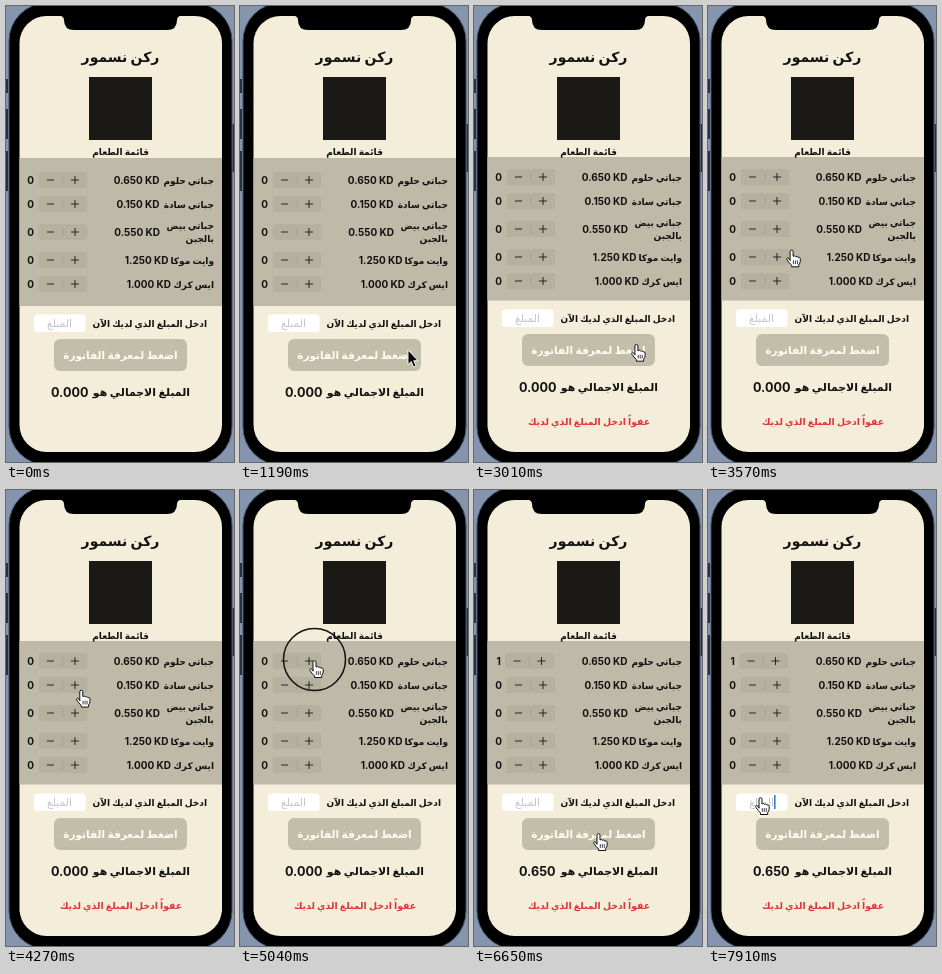
An HTML page that plays this animation: 228x456 px, repeating every 8 s.

```html
<!DOCTYPE html>
<html lang="ar">
<head>
<meta charset="utf-8">
<title>قائمة الطعام</title>
<style>
  html, body { margin: 0; width: 100%; height: 100%; overflow: hidden; background: #8595ad; }
  svg { display: block; width: 228px; height: 456px; }
  text { font: 700 10px Inter, 'DejaVu Sans', sans-serif; fill: #121212; }
  .ar { direction: rtl; font-size: 9px; }
  .mid { text-anchor: middle; }
  .end { text-anchor: end; }
</style>
</head>
<body>
<svg viewBox="0 0 228 456">
  <!-- phone -->
  <path d="M1 73v14M1 103v30M1 145v40M227.500 118v48" stroke="#27303f" stroke-width="2"/>
  <rect x="3" y="-3" width="223" height="462" rx="38" stroke="#40506a"/>
  <rect x="13.500" y="10" width="202.500" height="436" rx="27" fill="#f3edda"/>
  <path d="M53 9.500Q58 10 58 14Q58 24 68 24H161Q171 24 171 14Q171 10 176 9.500Z"/>

  <!-- header -->
  <text class="ar mid" x="114.500" y="56" style="font-size:14px">ركن نسمور</text>
  <rect x="83" y="71" width="63" height="63" fill="#1b1916"/>
  <rect id="panel" x="13.500" width="202.500" fill="#bebaa7"/>
  <text class="ar mid" x="114.500" y="148.500">قائمة الطعام</text>
  <g id="rows"></g>

  <!-- form -->
  <g id="form">
    <text class="ar" x="201" y="320.500">ادخل المبلغ الذي لديك الآن</text>
    <rect x="28" y="308.500" width="51.500" height="17.500" rx="3.500" fill="#fff"/>
    <text class="ar mid" x="53.500" y="320.500" style="font-size:10.800px;fill:#c5c5c9;font-weight:400">المبلغ</text>
    <rect id="caret" x="66" y="310" width="1.600" height="14" fill="#3978dc"/>
    <g id="button">
      <rect x="48" y="333" width="133" height="32" rx="6" fill="#c3bea9"/>
      <text class="ar mid" x="114.500" y="353" style="font-size:10.500px;fill:#fffdf3">اضغط لمعرفة الفاتورة</text>
    </g>
    <text class="ar" x="184" y="390" style="font-size:10.900px">المبلغ الاجمالي هو</text>
    <text id="total" x="45" y="390.500" style="font-size:12.600px"></text>
  </g>
  <text id="error" class="ar mid" x="115" y="418.500" style="font-size:9.300px;fill:#e0343b">عفواً ادخل المبلغ الذي لديك</text>

  <!-- pointer -->
  <circle id="ring" r="31" fill="none" stroke="#111" stroke-width="1.500"/>
  <path id="arrow" d="M0 0V14.500L3.300 11.500L5.500 17L8 16L5.700 10.700H10Z" stroke="#fff" stroke-width=".9"/>
  <g id="hand" stroke="#111" stroke-linejoin="round" stroke-linecap="round">
    <path fill="#fff" d="M4 10.800V2.200A1.500 1.500 0 0 1 7 2.200V7Q8.600 5.900 9.500 7.300Q11 6.500 11.800 7.900Q13.900 7.500 14.200 9.400V12Q14 14 12.700 15.500V17.500H5.500V16Q3 13.500 1 10.500Q.3 9 1.500 8.600Q2.600 8.500 4 10.800Z"/>
    <path fill="none" stroke-width=".8" d="M7.300 11.500v3M9.300 11.500v3M11.300 11.500v3"/>
  </g>
</svg>
<script>
const $ = id => document.getElementById(id);
const LOOP = 8000, TICK = 70;

// [centre y, price, right edge of price, name lines]
const items = [
  [174, '0.650', 153.5, 'جباتي حلوم'],
  [198, '0.150', 153.5, 'جباتي سادة'],
  [226, '0.550', 154, 'جباتي بيض', 'بالجبن'],
  [254, '1.250', 162.5, 'وايت موكا'],
  [278, '1.000', 165, 'ايس كرك']
];
$('rows').innerHTML = items.map(([y, price, right, ...lines]) => `
  ${lines.map((s, i) => `<text class="ar" x="208" y="${y + 3.5 + (i - (lines.length - 1) / 2) * 13}">${s}</text>`).join('')}
  <text class="end" x="${right}" y="${y + 3.7}">${price} KD</text>
  <g class="stepper">
    <rect x="32.500" y="${y - 8}" width="49" height="16" rx="4" fill="#b5b19f"/>
    <path d="M57 ${y - 4.5}v9" stroke="#a39f8f" stroke-width=".7"/>
    <path d="M41 ${y}h7M65 ${y}h8M69 ${y - 4}v8" stroke="#1a1a1a" stroke-width=".9"/>
  </g>
  <text class="mid count" x="24.700" y="${y + 3.7}">0</text>`).join('');
const firstStepper = document.querySelector('.stepper');
const firstCount = document.querySelector('.count');

// [time, x, y] with sine easing between stops
const arrowPath = [[910, 142, 344], [1190, 168, 344]];
const handPath = [
  [2870, 163, 345], [3710, 72, 236], [4760, 68, 170], [4830, 68, 170], [4900, 69, 170],
  [5250, 69, 170], [6020, 119, 343], [6790, 119, 343], [7280, 47, 307]
];
const presses = [[1400, 1540], [5040, 5250], [6440, 6580]];

function along(path, t) {
  const i = path.findIndex(p => p[0] > t);
  if (i < 0) return path[path.length - 1].slice(1);
  if (i === 0) return path[0].slice(1);
  const [t0, x0, y0] = path[i - 1], [t1, x1, y1] = path[i];
  const k = (1 - Math.cos(Math.PI * (t - t0) / (t1 - t0))) / 2;
  return [x0 + (x1 - x0) * k, y0 + (y1 - y0) * k];
}
const show = (id, on) => $(id).setAttribute('visibility', on ? 'visible' : 'hidden');
const move = (el, x, y) => el.setAttribute('transform', `translate(${x} ${y})`);

function draw(t) {
  const warned = t >= 1540, added = t >= 5250;
  const press = presses.findIndex(([a, b]) => t >= a && t < b);
  const [hx, hy] = along(handPath, t);

  $('panel').setAttribute('y', warned ? 151 : 152);
  $('panel').setAttribute('height', warned ? 143.5 : 148);
  move($('rows'), 0, warned ? -3 : 0);
  move($('form'), 0, warned ? -5 : 0);
  show('error', warned);

  move(firstStepper, added ? -1.5 : 0, 0);
  firstCount.textContent = added ? 1 : 0;
  $('total').textContent = t >= 6580 ? '0.650' : '0.000';
  $('button').setAttribute('opacity', press === 0 || press === 2 ? 0.6 : 1);
  show('caret', t >= 7910);

  show('arrow', t >= 980 && t < 1400);
  move($('arrow'), ...along(arrowPath, t));
  show('hand', t >= 1400);
  move($('hand'), hx, hy);
  show('ring', press >= 0);
  move($('ring'), hx + 5.5, hy - 0.5);
}

function frame() {
  draw(Math.floor(performance.now() % LOOP / TICK) * TICK);
  requestAnimationFrame(frame);
}
frame();
</script>
</body>
</html>
```
